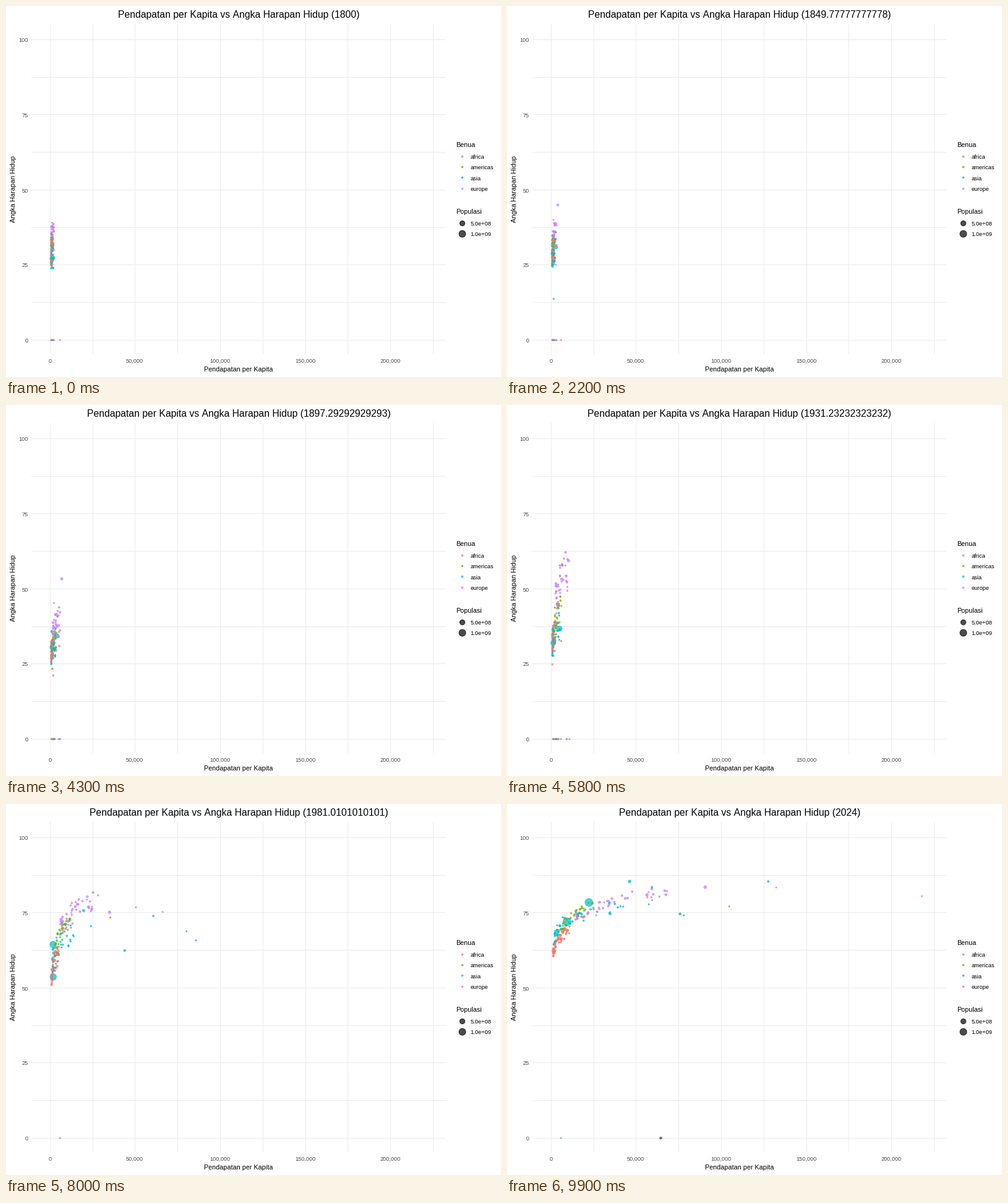
Recreate the animation shown at these times as a matplotlib script. Size 800 by 600 pixels, loop 10000 ms.

```python
import numpy as np
import matplotlib.pyplot as plt
from matplotlib.animation import FuncAnimation

FRAMES, INTERVAL = 100, 100
DPI = 100
PX = 72 / DPI  # points per pixel
GRAY, GRID = "#4D4D4D", "#EBEBEB"
plt.rcParams["font.family"] = "Liberation Sans"
plt.rcParams["text.kerning_factor"] = 6  # no pair kerning

rng = np.random.default_rng(7)
t = np.linspace(0, 1, FRAMES)
years = 1800 + 224 * np.arange(FRAMES) / (FRAMES - 1)

# Ranges (low, high) for the first and last year; income in thousands.
CONTINENTS = {
    "africa": dict(color="#F8766D", count=52, income=((.4, 1.6), (.9, 11)),
                   power=2, life=((25, 34), (61, 71)), middle=1962),
    "americas": dict(color="#7CAE00", count=32, income=((.5, 2), (5, 30)),
                     power=1.5, life=((25, 36), (68, 80)), middle=1951),
    "asia": dict(color="#00BFC4", count=42, income=((.5, 2), (1.5, 42)),
                 power=2.2, life=((24, 34), (65, 80)), middle=1961),
    "europe": dict(color="#C77CFF", count=42, income=((.7, 2.2), (13, 70)),
                   power=1.5, life=((29, 39), (71, 84)), middle=1937),
}

# Standouts: population (millions), then (income, life) at the last key years.
KEYS = (1800, 1931, 1965, 1999, 2024)
STANDOUTS = [
    ("asia", 1400, (.8, 58.6), (4, 71), (22.2, 78.4)),
    ("asia", 1430, (1.2, 46), (2.9, 62.2), (9.3, 72)),
    ("asia", 36, (24.2, 56.4), (85, 69.2), (75.7, 74.6)),
    ("asia", 12, (64.7, 69.7), (56.3, 78.6), (59.2, 83.5)),
    ("asia", .5, (72.3, 65.9), (89.9, 72.1), (57.4, 77.8)),
    ("asia", .4, (90.6, 61.8), (80.3, 70.3), (77.9, 74.1)),
    ("asia", 8, (11.3, 63.3), (56, 78.6), (127.5, 85.4)),
    ("asia", 80, (10.9, 71), (38.1, 81), (46.1, 85.4)),
    ("americas", .4, (25, 70.3), (52, 76.9), (104.6, 77.1)),
    ("europe", 84, (18.5, 72), (71.2, 78.7), (90.5, 83.5)),
    ("europe", .1, (35.8, 72.2), (131.7, 78.7), (217.8, 80.5)),
    ("europe", .6, (29.8, 76.2), (91, 77.5), (132.2, 83.4)),
]


def dip(year, depth, width):
    return depth * np.exp(-((years - year) / width) ** 2)


def develop(spec):
    """Income and life of one random country in every frame."""
    u, v = rng.random(2)
    (lo0, hi0), (lo1, hi1) = spec["income"]
    start, end = lo0 * (hi0 / lo0) ** u, lo1 * (hi1 / lo1) ** u
    income = start * (end / start) ** (t ** spec["power"])

    # Richer countries rise earlier and end up living longer.
    rank = v + (.75 * u + .25 * v - v) * t
    (lo0, hi0), (lo1, hi1) = spec["life"]
    middle = spec["middle"] + 8 * (1 - 2 * rank)
    rise = 1 / (1 + np.exp((middle - years) / 16))
    life = lo0 + (hi0 - lo0) * rank
    life += rise * (lo1 + (hi1 - lo1) * rank - life)
    return income, life


def unsettle(income, life, cont):
    """Add small swings and the setbacks of epidemics and wars."""
    a, b = rng.uniform(0, 2 * np.pi, 2)
    income = income * (1 + .05 * np.sin(years / 4 + a))
    life = life + .8 * np.sin(years / 5 + b)
    life -= dip(1918, rng.uniform(3, 10), 1.3)
    life -= dip(rng.uniform(1815, 1940), rng.uniform(3, 16), 2)
    if cont == "europe":
        life -= dip(1943, rng.uniform(0, 9), 2)
    if cont == "africa":
        life -= dip(2000, rng.uniform(2, 12), 12)
    return income, life


def populate(pop, cont):
    shrink = 170 if cont == "europe" else 85
    return pop * np.exp((years - 2024) / shrink)


def follow(income, life, points):
    """Bend a random path so that it meets the given late points."""
    inc_keys = np.interp(KEYS, years, np.log(income))
    life_keys = np.interp(KEYS, years, life)
    late_income, late_life = np.transpose(points)
    inc_keys[2:], life_keys[2:] = np.log(late_income), late_life
    return (np.exp(np.interp(years, KEYS, inc_keys)),
            np.interp(years, KEYS, life_keys))


data, tints = [], []


def add(cont, income, life, pop):
    data.append((income, life, pop))
    tints.append(CONTINENTS[cont]["color"])


for cont, spec in CONTINENTS.items():
    for k in range(spec["count"]):
        income, life = unsettle(*develop(spec), cont)
        pop = min(rng.lognormal(2, 1.3), 70)
        if k < 4:  # small countries without early life data
            life[years < 1950] = 0
            pop = min(pop, 3)
        add(cont, income, life, populate(pop, cont))

for cont, pop, *points in STANDOUTS:
    path = follow(*develop(CONTINENTS[cont]), points)
    add(cont, *path, populate(pop, cont))

# Known income but no life data, from the given year on.
for cont, income, first, pop in (("europe", 5.8, 1800, 3),
                                 ("asia", 64.4, 2022, 20)):
    add(cont, np.full(FRAMES, income), np.where(years < first, np.nan, 0),
        populate(pop, cont))

order = rng.permutation(len(data))
incomes, lives, pops = np.array(data)[order].transpose(1, 0, 2)
tints = [tints[k] for k in order]


def px_x(income):
    return 71.3 + 2.752 * income


def px_y(life):
    return 540.3 - 4.86 * life


def area(pop):
    """Marker area for a population in millions, less the outline."""
    return ((1.9 + 9.1 * np.sqrt(np.asarray(pop) / 1000)) * PX) ** 2


fig = plt.figure(figsize=(8, 6), dpi=DPI, facecolor="white")
ax = fig.add_axes([0, 0, 1, 1])
ax.set(xlim=(0, 800), ylim=(600, 0))
ax.axis("off")


def label(x, y, text, size, color="black", **kw):
    kw = {"ha": "left", "va": "baseline", **kw}
    return ax.text(x, y, text, fontsize=size * PX, color=color, **kw)


def dots(x, y, s, c):
    return ax.scatter(x, y, s=s, c=c, edgecolors=c, linewidths=PX,
                      alpha=.7, zorder=3)


def rule(x, y):
    """One crisp pixel wide line."""
    ax.plot(x, y, color=GRID, lw=PX, zorder=1, snap=False,
            solid_capstyle="butt")


for k in range(10):
    x = np.floor(px_x(25 * k)) + .5
    rule([x, x], [29, 563])
    if k % 2 == 0:
        label(x - .6, 577, f"{25000 * k:,}", 9.1, GRAY, ha="center")
for k in range(9):
    y = np.floor(px_y(12.5 * k)) + .5
    rule([41, 711], [y, y])
    if k % 2 == 0:
        label(36, y + 4, f"{12.5 * k:.0f}", 9.1, GRAY, ha="right")

title = label(375.9, 19, "", 15.8, ha="center")
label(375.5, 591, "Pendapatan per Kapita", 10.75, ha="center")
label(12.3, 295.7, "Angka Harapan Hidup", 10.9, ha="center", va="center",
      rotation=90)

label(727.5, 228, "Benua", 10.75)
for k, (name, spec) in enumerate(CONTINENTS.items()):
    y = 242.5 + 17.4 * k
    dots([736.5], [y], area(8), [spec["color"]])
    label(750.5, y + 4.5, name, 9.3)
label(727.5, 336, "Populasi", 10.75)
for pop, name, y in ((500, "5.0e+08", 350.7), (1000, "1.0e+09", 367.5)):
    dots([736.5], [y], area(pop), ["black"])
    label(750.5, y + 4.5, name, 9.3)

points = dots(px_x(incomes[:, 0]), px_y(lives[:, 0]), area(pops[:, 0]), tints)


def draw(i):
    title.set_text("Pendapatan per Kapita vs Angka Harapan Hidup "
                   f"({years[i]:.15g})")
    points.set_offsets(np.c_[px_x(incomes[:, i]), px_y(lives[:, i])])
    points.set_sizes(area(pops[:, i]))
    return title, points


anim = FuncAnimation(fig, draw, frames=FRAMES, interval=INTERVAL,
                     repeat=True, repeat_delay=0)
plt.show()
```
